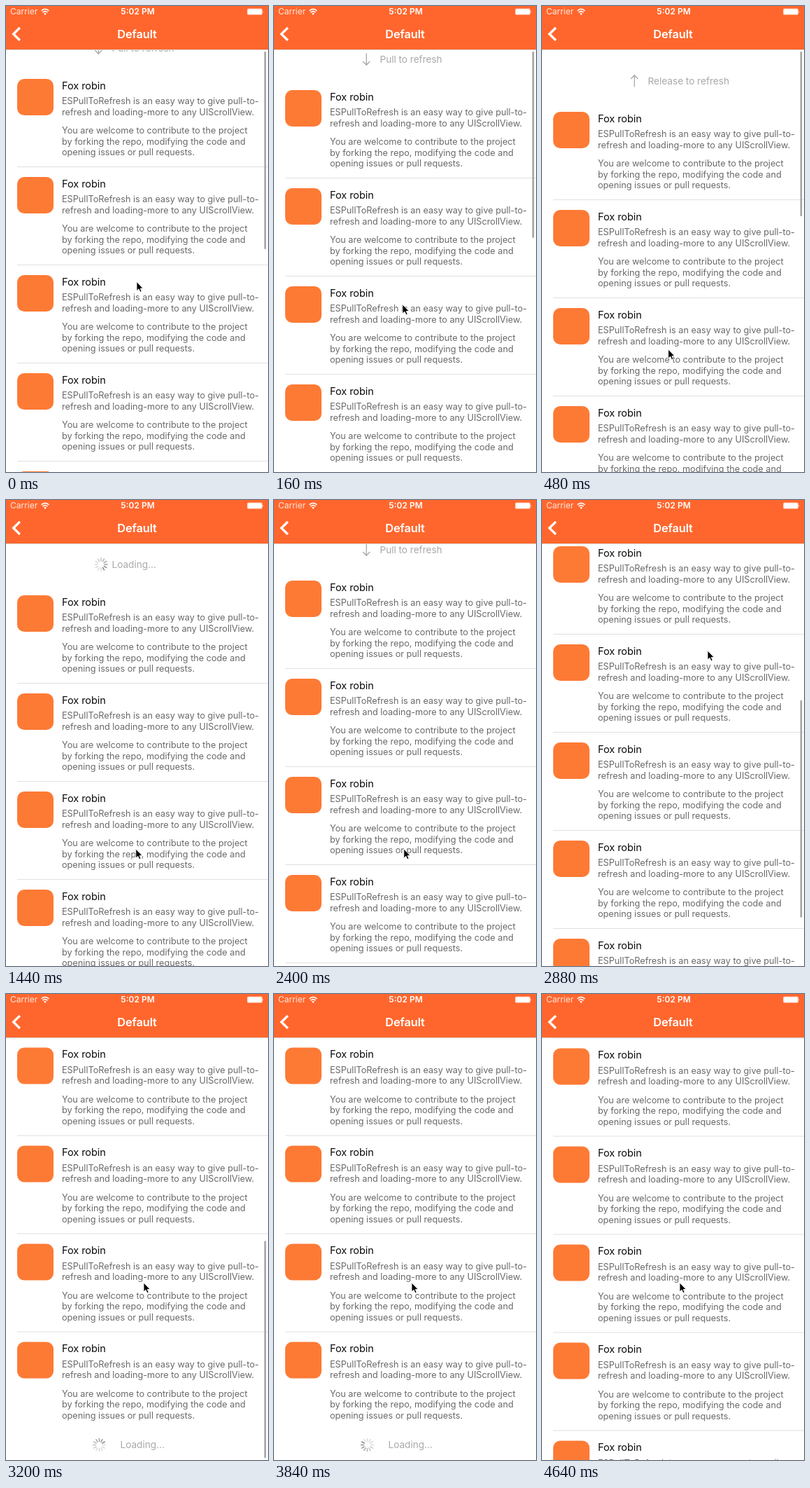
An HTML page that plays this animation: 375x665 px, repeating every 6.64 s.

```html
<!DOCTYPE html>
<html lang="en">
<head>
<meta charset="utf-8">
<title>Pull to refresh</title>
<style>
  html, body { margin: 0; width: 100%; height: 100%; overflow: hidden; background: #fff; }
  svg { display: block; width: 375px; height: 665px; font-family: Inter, Roboto, sans-serif; }
  .title { font-size: 14.6px; letter-spacing: -.1px; fill: #0a0a0a; }
  .body { font-size: 12.75px; letter-spacing: -.04px; fill: #6a6a6a; }
  .hint { font-size: 13.7px; letter-spacing: -.05px; fill: #a9a9a9; }
  .nav { font-size: 16.5px; font-weight: 600; letter-spacing: -.2px; }
  .status { font-size: 12px; }
  .line { fill: #e0e0e2; }
  .arrow { fill: none; stroke: #a6a6a6; stroke-width: 1.3; }
  .spinner line { stroke: #8a8a8a; stroke-width: 1.6; stroke-linecap: round; }
</style>
</head>
<body>
<svg viewBox="0 0 375 665">
  <rect width="375" height="665" fill="#fff"/>
  <g id="list">
    <g id="header">
      <path id="arrow" class="arrow" d="M0-8.5V8M-5 3L0 8.3 5 3"/>
      <g id="topSpin" class="spinner" transform="translate(136 -30)"></g>
      <text id="hint" class="hint" x="151.5" y="-25.2"></text>
    </g>
    <g id="rows"></g>
    <g id="footer" transform="translate(0 1120)">
      <g id="endSpin" class="spinner" transform="translate(133.5 21)"></g>
      <text class="hint" x="163.5" y="25.8">Loading...</text>
    </g>
  </g>
  <rect id="bar" x="369.6" width="2.6" rx="1.3" fill="#a3a3a3"/>

  <rect width="375" height="62" fill="#ff662d"/>
  <rect y="62" width="375" height="1" fill="#d8d4d2"/>
  <g fill="#fff">
    <text class="status" x="6" y="12.4" opacity=".85">Carrier</text>
    <text class="status" x="188.5" y="12.4" font-weight="600" text-anchor="middle">5:02 PM</text>
    <text class="nav" x="187.5" y="46" text-anchor="middle">Default</text>
    <rect x="345" y="3.6" width="22" height="9.2" rx="2" opacity=".6"/>
    <rect x="346" y="4.6" width="20" height="7.2" rx="1"/>
    <path d="M367.4 6.6q1.6 1.6 0 3.3z"/>
    <path d="M56 13l-2-2.2q2-1.6 4 0z"/>
  </g>
  <g fill="none" stroke="#fff">
    <path stroke-width="1.6" d="M50.6 6.8q5.4-4.8 10.8 0M52.5 9.1q3.5-3 7 0"/>
    <path stroke-width="3.3" d="M19.8 31L10.6 40l9.2 9"/>
  </g>

  <g id="cursor">
    <path d="M0 0V14.4L3.4 11.4 5.6 16.4 8 15.4 5.9 10.6H10.3Z" transform="scale(.9)"
          stroke="#fff" stroke-width="1"/>
  </g>
</svg>
<script>
const $ = id => document.getElementById(id);
const STEP = 160, LAST = 29, LOOP = 6640;
const ROW = 140, TOP = 62, ROWS = 8;
const MAX_SCROLL = 559, BAR = 310, BAR_TRAVEL = 287;

const copy = [
  [50.4, 'ESPullToRefresh is an easy way to give pull-to-'],
  [65.9, 'refresh and loading-more to any UIScrollView.'],
  [92, 'You are welcome to contribute to the project'],
  [107.5, 'by forking the repo, modifying the code and'],
  [123, 'opening issues or pull requests.']
];

function row(i) {
  const lines = copy.map(([y, s]) => `<text class="body" x="80" y="${y}">${s}</text>`).join('');
  const rule = `<rect class="line" x="16" y="139" width="359" height="1"/>`;
  return `<g transform="translate(0 ${i * ROW})">
    <rect x="16" y="14" width="52" height="52" rx="10" fill="#fd7a35"/>
    <text class="title" x="80" y="28.6">Fox robin</text>
    ${lines}${i === ROWS - 1 ? `<g class="more">${rule}</g>` : rule}</g>`;
}
$('rows').innerHTML = Array.from({ length: ROWS }, (_, i) => row(i)).join('') +
  `<g class="more">${row(ROWS)}</g>`;

const spokes = Array.from({ length: 12 }, (_, i) =>
  `<line y1="-5" y2="-9" transform="rotate(${i * 30})"/>`).join('');
$('topSpin').innerHTML = $('endSpin').innerHTML = spokes;

// step, list shift, cursor x, cursor y
const poses = [
  [0, 28, 187, 393.5], [1, 44, 184, 426], [2, 62, 181, 461], [3, 75, 180.7, 490],
  [4, 79, 183, 497], [5, 72, 185.8, 498], [6, 61, 185.8, 498], [7, 60, 185.8, 498],
  [15, 39, 185.8, 498], [16, -64, 203, 400], [17, -265, 237.5, 199.5], [18, -430, 237, 215],
  [19, -530, 215, 330], [20, -559.5, 197, 412], [29, -558.5, 197, 412]
];

const show = (el, on) => el.setAttribute('visibility', on ? 'visible' : 'hidden');
const move = (el, x, y) => el.setAttribute('transform', `translate(${x} ${y})`);

function spin(el, t) {
  const head = Math.floor(t * 12 / 1000) % 12;
  [...el.children].forEach((s, i) => {
    const age = (head - i + 12) % 12;
    s.setAttribute('opacity', Math.max(.3, 1 - age * .1));
  });
}

function render(step) {
  const [, shift, x, y] = poses.filter(p => p[0] <= step).pop();
  move($('list'), 0, TOP + shift);
  move($('cursor'), x, y);

  const loading = step >= 5 && step < 15;
  const ready = step >= 2 && step < 5;
  $('hint').textContent = loading ? 'Loading...' : ready ? 'Release to refresh' : 'Pull to refresh';
  $('arrow').setAttribute('transform', `translate(132.3 -30) rotate(${ready ? 180 : 0})`);
  show($('arrow'), !loading);
  show($('topSpin'), loading);
  spin($('topSpin'), step * STEP);
  spin($('endSpin'), step * STEP);

  const loaded = step === LAST;
  show($('footer'), !loaded);
  document.querySelectorAll('.more').forEach(el => show(el, loaded));

  const pull = Math.max(0, shift), scroll = Math.max(0, -shift);
  $('bar').setAttribute('y', 65 + scroll / MAX_SCROLL * BAR_TRAVEL);
  $('bar').setAttribute('height', BAR - pull);
  $('bar').setAttribute('opacity', step < 6 || (step > 15 && step < 21) ? 1 : step === 6 ? .5 : 0);
}

let start, shown = 0;
function frame(now) {
  start ??= now;
  const step = Math.min(LAST, Math.floor((now - start) % LOOP / STEP));
  if (step !== shown) render(shown = step);
  requestAnimationFrame(frame);
}
render(0);
requestAnimationFrame(frame);
</script>
</body>
</html>
```
